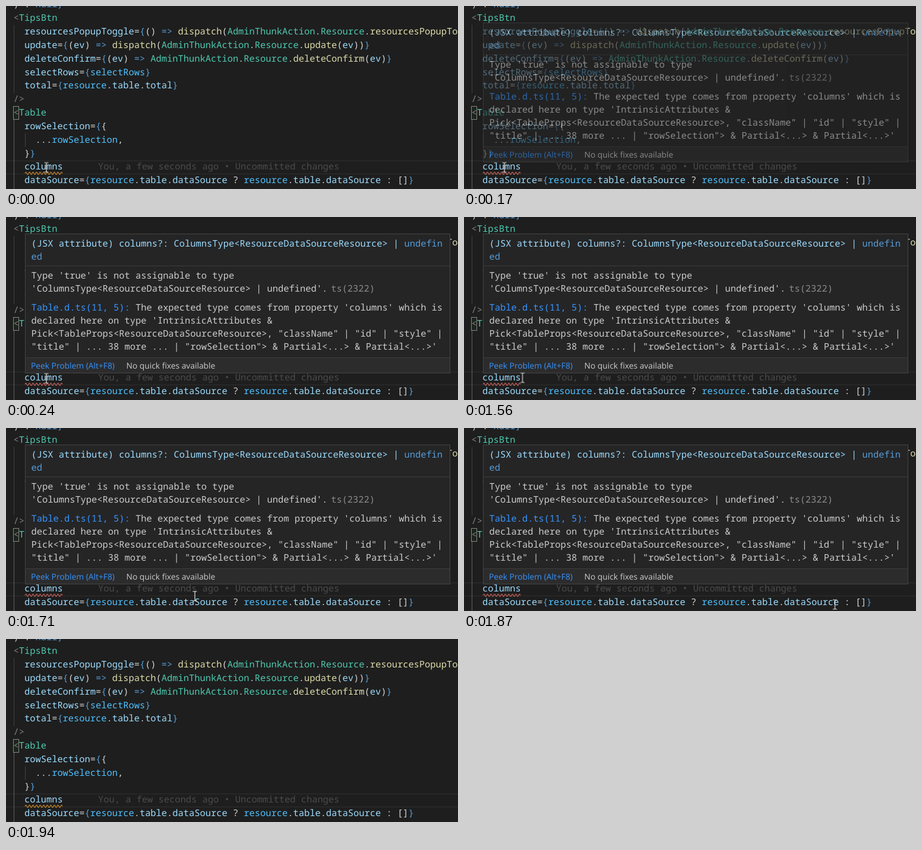
Write an HTML page that moves like this. It is 761 px wide and 309 px high and loops after 2.11 s.

```html
<!DOCTYPE html>
<html lang="en">
<head>
<meta charset="utf-8">
<title>Editor hover</title>
<style>
  html, body { margin: 0; width: 100%; height: 100%; overflow: hidden; background: #1e1e1e; }
  svg { display: block; width: 761px; height: 309px; }
  text { font: 15.4px "Noto Sans Mono", monospace; white-space: pre; fill: #d4d4d4; text-rendering: geometricPrecision; }
  .attr { fill: #9cdcfe; }
  .const { fill: #4fc1ff; }
  .key { fill: #569cd6; }
  .fn { fill: #dcdcaa; }
  .type { fill: #4ec9b0; }
  .angle { fill: #808080; }
  .blame { fill: #4b4b4b; }
  .link { fill: #3794ff; }
  .dim { fill: #8b8b8b; }
  .guide { stroke: #404040; }
  .guide.active { stroke: #606060; }
  #hover text { fill: #cccccc; }
  #hover text.attr { fill: #9cdcfe; }
  #hover .action { font: 13.8px "Open Sans", sans-serif; }
  #hover .action.link { fill: #3794ff; }

  #hover, #squiggle, #pointer { animation: 2110ms step-end infinite; }
  #hover { animation-name: fade; }
  #squiggle { animation-name: severity; fill: none; stroke-width: 1.1; }
  #pointer { animation-name: move; fill: none; stroke: #e4e4e4; stroke-width: 1.2; }

  @keyframes fade {
    0% { opacity: 0; }
    8.05% { opacity: .62; }
    11.37% { opacity: 1; }
    91.94%, 100% { opacity: 0; }
  }
  @keyframes severity {
    0% { stroke: #d9932f; }
    8.05% { stroke: #d96a62; }
    91.94%, 100% { stroke: #d9932f; }
  }
  @keyframes move {
    0% { transform: translate(68px, 272.5px); opacity: 1; }
    73.93% { transform: translate(98.5px, 271.5px); opacity: 1; }
    77.25% { transform: translate(176px, 276px); opacity: 1; }
    81.04% { transform: translate(318px, 284px); opacity: 1; }
    84.83% { transform: translate(484px, 292px); opacity: 1; }
    88.62% { transform: translate(624.5px, 298px); opacity: 1; }
    91.94%, 100% { transform: translate(624.5px, 298px); opacity: 0; }
  }
</style>
</head>
<body>
<svg viewBox="0 0 761 309">
  <path d="M0 261.5H761M0 283.5H761" stroke="#2b2b2b" stroke-width="1.5"/>
  <path class="guide" d="M13.5 32V147M32.5 215V238"/>
  <path class="guide active" d="M13.5 192V309"/>
  <rect x="12.5" y="169.5" width="9" height="22" fill="#1c251c" stroke="#888"/>

  <g id="code">
    <text>) : <tspan class="key">null}</tspan></text>
    <text><tspan class="angle">&lt;</tspan><tspan class="type">TipsBtn</tspan></text>
    <text>  <tspan class="attr">resourcesPopupToggle</tspan>=<tspan class="key">{</tspan>() <tspan class="key">=&gt;</tspan> <tspan class="fn">dispatch</tspan>(<tspan class="type">AdminThunkAction</tspan>.<tspan class="type">Resource</tspan>.<tspan class="fn">resourcesPopupTo</tspan></text>
    <text>  <tspan class="attr">update</tspan>=<tspan class="key">{</tspan>(<tspan class="attr">ev</tspan>) <tspan class="key">=&gt;</tspan> <tspan class="fn">dispatch</tspan>(<tspan class="type">AdminThunkAction</tspan>.<tspan class="type">Resource</tspan>.<tspan class="fn">update</tspan>(<tspan class="attr">ev</tspan>))<tspan class="key">}</tspan></text>
    <text>  <tspan class="attr">deleteConfirm</tspan>=<tspan class="key">{</tspan>(<tspan class="attr">ev</tspan>) <tspan class="key">=&gt;</tspan> <tspan class="type">AdminThunkAction</tspan>.<tspan class="type">Resource</tspan>.<tspan class="fn">deleteConfirm</tspan>(<tspan class="attr">ev</tspan>)<tspan class="key">}</tspan></text>
    <text>  <tspan class="attr">selectRows</tspan>=<tspan class="key">{</tspan><tspan class="const">selectRows</tspan><tspan class="key">}</tspan></text>
    <text>  <tspan class="attr">total</tspan>=<tspan class="key">{</tspan><tspan class="const">resource</tspan>.<tspan class="attr">table</tspan>.<tspan class="attr">total</tspan><tspan class="key">}</tspan></text>
    <text><tspan class="angle">/&gt;</tspan></text>
    <text><tspan class="angle">&lt;</tspan><tspan class="type">Table</tspan></text>
    <text>  <tspan class="attr">rowSelection</tspan>=<tspan class="key">{</tspan>{</text>
    <text>    ...<tspan class="const">rowSelection</tspan>,</text>
    <text>  }<tspan class="key">}</tspan></text>
    <text>  <tspan class="attr">columns</tspan></text>
    <text>  <tspan class="attr">dataSource</tspan>=<tspan class="key">{</tspan><tspan class="const">resource</tspan>.<tspan class="attr">table</tspan>.<tspan class="attr">dataSource</tspan> ? <tspan class="const">resource</tspan>.<tspan class="attr">table</tspan>.<tspan class="attr">dataSource</tspan> : []<tspan class="key">}</tspan></text>
  </g>
  <text class="blame" x="155" y="276.3">You, a few seconds ago • Uncommitted changes</text>
  <path id="squiggle"/>

  <g id="hover">
    <rect x="32.5" y="28.5" width="715" height="235" fill="#252526" stroke="#454545"/>
    <rect x="33" y="238" width="714" height="25" fill="#2c2c2d"/>
    <path d="M33 82.5H747M33 237.5H747" stroke="#3c3c3d"/>
    <text class="attr" x="42.5" y="50.3">(JSX attribute) columns?: ColumnsType&lt;ResourceDataSourceResource&gt; | <tspan class="key">undefin</tspan></text>
    <text x="42.5" y="72.3"><tspan class="key">ed</tspan></text>
    <text x="42.5" y="104.3">Type 'true' is not assignable to type</text>
    <text x="42.5" y="126.3">'ColumnsType&lt;ResourceDataSourceResource&gt; | undefined'.<tspan class="dim" dx="6">ts(2322)</tspan></text>
    <text x="42.5" y="158.3"><tspan class="link">Table.d.ts(11, 5): </tspan>The expected type comes from property 'columns' which is</text>
    <text x="42.5" y="180.3">declared here on type 'IntrinsicAttributes &amp;</text>
    <text x="42.5" y="202.3">Pick&lt;TableProps&lt;ResourceDataSourceResource&gt;, "className" | "id" | "style" |</text>
    <text x="42.5" y="224.3">"title" | ... 38 more ... | "rowSelection"&gt; &amp; Partial&lt;...&gt; &amp; Partial&lt;...&gt;'</text>
    <text class="action link" x="42" y="255.5">Peek Problem (Alt+F8)</text>
    <text class="action" x="202.5" y="255.5">No quick fixes available</text>
  </g>

  <path id="pointer" d="M-3.5-8H-1.2L0-7L1.2-8H3.5M0-7V7M-3.5 8H-1.2L0 7L1.2 8H3.5"/>
</svg>
<script>
  const LEFT = 12.5, FIRST_BASELINE = 2.4, LINE_HEIGHT = 22.83;
  document.querySelectorAll('#code text').forEach((line, i) => {
    line.setAttribute('x', LEFT);
    line.setAttribute('y', FIRST_BASELINE + i * LINE_HEIGHT);
  });
  document.getElementById('squiggle')
    .setAttribute('d', 'M32 282.5' + 'q1.5-4 3 0t3 0'.repeat(10) + 'q1.5-4 3 0');
</script>
</body>
</html>
```
